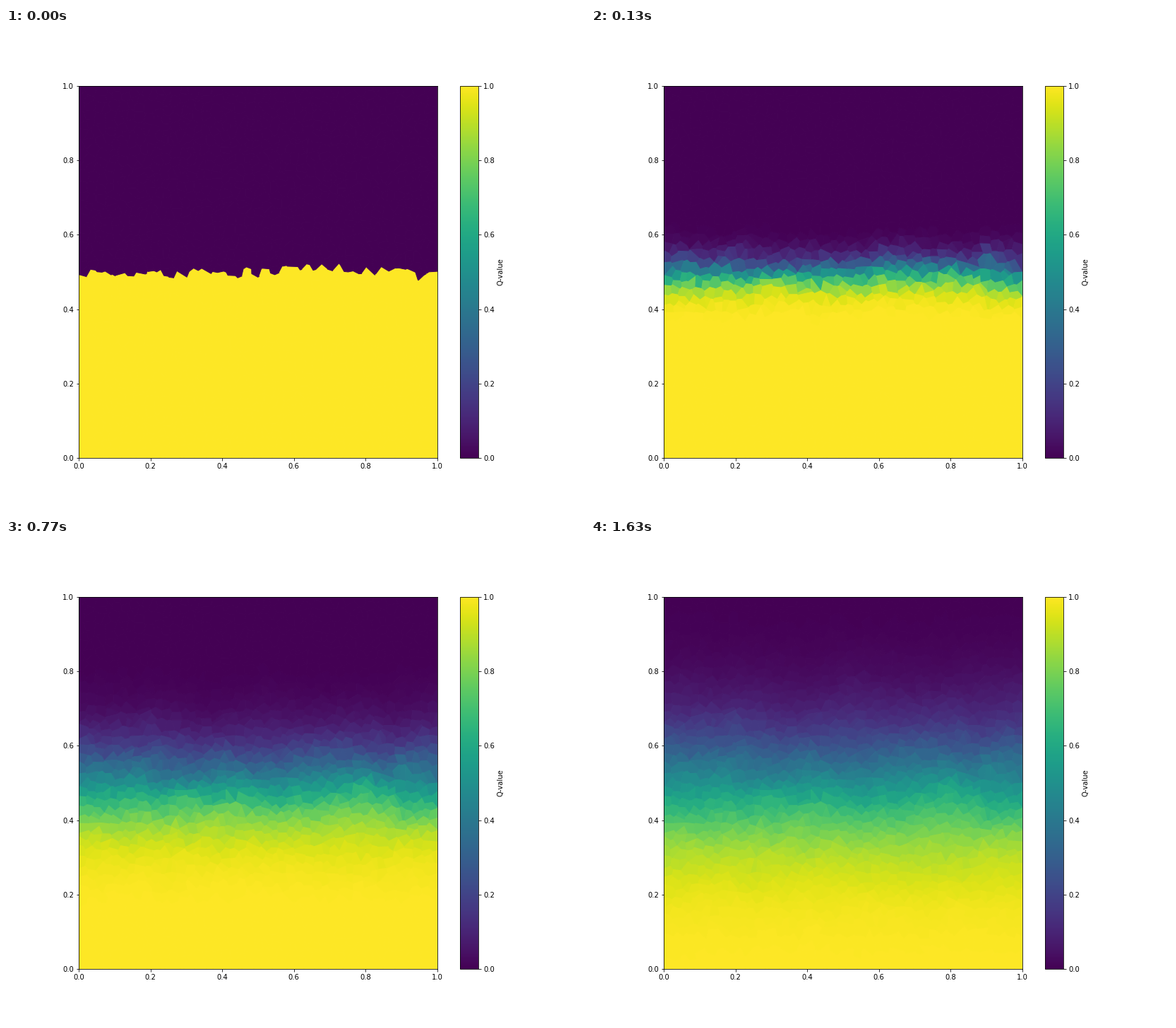
A matplotlib script that plays this animation: 820 px wide and 683 px high, repeating every 1660 ms.

```python
import numpy as np
import matplotlib.pyplot as plt
from matplotlib.animation import FuncAnimation
from matplotlib.collections import PolyCollection
from matplotlib.tri import Triangulation

W, H, DPI = 820, 683, 72
FRAMES, LOOP_MS = 50, 1660
GRID = 43                # cells per side before jitter
SUBSTEPS = 3             # diffusion steps per frame
FINAL_VAR = 0.0265       # squared width of the blurred front at the end


def make_seeds(rng):
    """Jittered cell centres; those of the lower half start at 1."""
    ix, iy = np.meshgrid(np.arange(GRID), np.arange(GRID))
    x, y = ((np.array([ix.ravel(), iy.ravel()])
             + rng.random((2, GRID * GRID))) / GRID)
    start = np.where(y < 0.5, 1.0, 0.0)
    # gentle waviness of the front, fading towards top and bottom
    lift = np.interp(x, [0, .08, .17, .28, .4, .52, .68, .85, 1],
                     [0, -.01, .004, -.01, .008, -.005, .018, 0, -.008])
    y = y + lift * np.exp(-((y - 0.5) / 0.25) ** 2) * (1 - (2 * y - 1) ** 2)
    return np.column_stack([x, y]), start


def voronoi(pts, rng):
    """Voronoi polygons in the unit square and the pairs of neighbours."""
    n = len(pts)
    x, y = pts.T
    mirrored = [(-x, y), (2 - x, y), (x, -y), (x, 2 - y)]
    every = np.vstack([pts] + [np.column_stack(m) for m in mirrored])
    every[n:] += rng.normal(0, 1e-6, every[n:].shape)

    tri = Triangulation(*every.T)
    a, b, c = every[tri.triangles].transpose(1, 0, 2)
    u, v = b - a, c - a
    uu, vv = (u ** 2).sum(1), (v ** 2).sum(1)
    with np.errstate(divide="ignore", invalid="ignore"):
        d = 2 * (u[:, 0] * v[:, 1] - u[:, 1] * v[:, 0])
        centre = a + np.column_stack([(v[:, 1] * uu - u[:, 1] * vv) / d,
                                      (u[:, 0] * vv - v[:, 0] * uu) / d])
    owned = [[] for _ in range(n)]
    for k, corners in enumerate(tri.triangles):
        for i in corners:
            if i < n:
                owned[i].append(k)
    polys = []
    for p, ks in zip(pts, owned):
        ring = centre[ks]
        turn = np.arctan2(ring[:, 1] - p[1], ring[:, 0] - p[0])
        polys.append(ring[np.argsort(turn)])
    return polys, tri.edges[(tri.edges < n).all(axis=1)]


def neighbour_mean(n, edges):
    """Matrix that replaces each value by the mean of its neighbours."""
    i, j = edges.T
    m = np.zeros((n, n))
    m[i, j] = m[j, i] = 1
    return m / m.sum(1, keepdims=True)


def diffuse(start, mean, rate):
    q = start
    states = [q]
    for n in range(1, FRAMES):
        for _ in range(SUBSTEPS + (n == 1)):
            q = q + rate * (mean @ q - q)
        states.append(q)
    return states


rng = np.random.default_rng(7)
seeds, start = make_seeds(rng)
polys, edges = voronoi(seeds, rng)
mean = neighbour_mean(len(seeds), edges)

# Set the rate so that the front ends with the wanted width
rate = 0.4
for _ in range(2):
    leaked = diffuse(start, mean, rate)[-1][start == 0].sum() / len(seeds)
    rate = min(0.95, rate * FINAL_VAR / (2 * np.pi * leaked ** 2))
states = diffuse(start, mean, rate)

fig, ax = plt.subplots(figsize=(W / DPI + 1e-9, H / DPI + 1e-9), dpi=DPI)
fig.subplots_adjust(left=103 / W)
cells = PolyCollection(polys, array=start, cmap="viridis", edgecolors="face",
                       linewidths=1)
cells.set_clim(0, 1)
ax.add_collection(cells, autolim=False)
ax.set(xlim=(0, 1), ylim=(0, 1))
fig.colorbar(cells, ax=ax, label="Q-value")


def update(n):
    cells.set_array(states[n])
    return cells,


anim = FuncAnimation(fig, update, frames=FRAMES, interval=LOOP_MS / FRAMES,
                     repeat=True, repeat_delay=0, blit=False)
plt.show()
```
